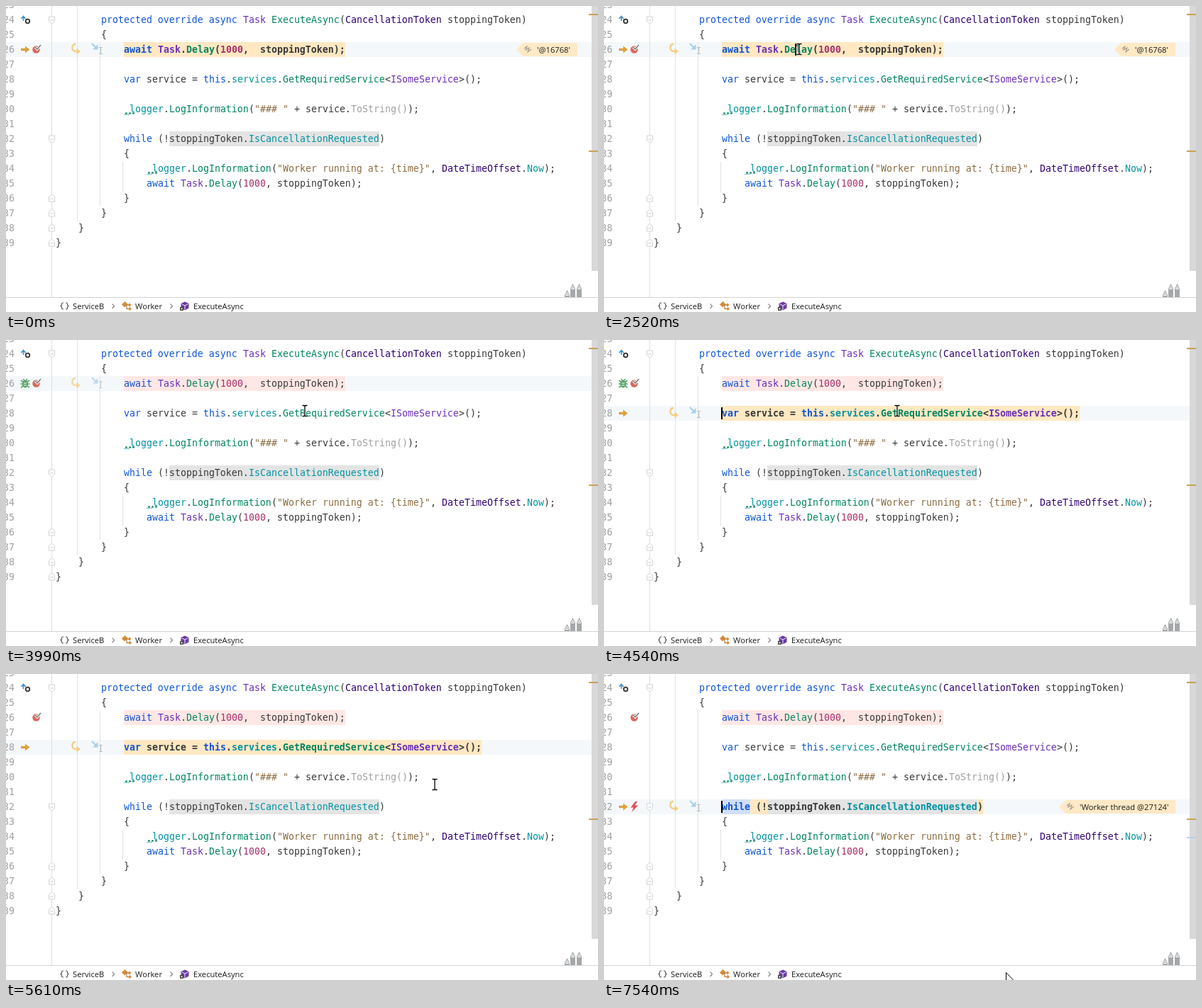
Recreate the animation shown at these times as an HTML page. Size 834 px wide and 432 px high, loop 8 s.

```html
<!DOCTYPE html>
<html lang="en">
<head>
<meta charset="utf-8">
<title>Debugger stepping</title>
<style>
  html, body { margin: 0; width: 100%; height: 100%; overflow: hidden; background: #fff; }
  svg { display: block; width: 834px; height: 432px; }
  text { white-space: pre; }
  .code { font: 13.288px "DejaVu Sans Mono", "Noto Sans Mono", monospace; fill: #383838; }
  .bold { font-weight: bold; }
  .ui { font: 11.2px "Open Sans", "Noto Sans", sans-serif; fill: #1a1a1a; }
  .k { fill: #0f54d6; } .t { fill: #6b2fba; } .m { fill: #00855f; } .f { fill: #0093a1; }
  .s { fill: #8c6c41; } .n { fill: #ab2f6b; } .v { fill: #300073; } .g { fill: #a0a0a0; }
</style>
</head>
<body>
<svg id="stage" viewBox="0 0 834 432" xmlns="http://www.w3.org/2000/svg"></svg>
<script>
(() => {
const LOOP = 8000, CHAR = 8, LEFT = 70, ROW = 21;
const EXEC = '#ffe8c2', PINK = '#ffe7e5';
const stage = document.getElementById('stage');
const rowTop = n => 9 + (n - 24) * ROW;

function add(name, attrs = {}, parent = stage, text) {
  const el = document.createElementNS('http://www.w3.org/2000/svg', name);
  for (const key in attrs) el.setAttribute(key, attrs[key]);
  if (text !== undefined) el.textContent = text;
  parent.appendChild(el);
  return el;
}
const group = (parent = stage) => add('g', {}, parent);
const rect = (x, y, width, height, fill, parent) => add('rect', { x, y, width, height, fill }, parent);
const path = (d, fill, parent) => add('path', { d, fill }, parent);
const stroke = (d, color, width = 1, parent) =>
  add('path', { d, fill: 'none', stroke: color, 'stroke-width': width }, parent);
const label = (x, y, text, parent, cls = 'ui') => add('text', { x, y, class: cls }, parent, text);
const show = (el, on) => el.setAttribute('visibility', on ? 'visible' : 'hidden');
const move = (el, x, y) => el.setAttribute('transform', `translate(${x} ${y})`);

// Each line: indent, then tokens split by "|" whose first letter is the colour class.
const logger = 'f_logger|d.|mLogInformation|d(|s';
const lines = {
  24: [8, 'kprotected override async |tTask |mExecuteAsync|d(|vCancellationToken|d stoppingToken)'],
  25: [8, 'd{'],
  26: [12, 'kawait |tTask|d.|mDelay|d(|n1000|d,  stoppingToken);'],
  28: [12, 'kvar |dservice = |kthis|d.|fservices|d.|mGetRequiredService|d<|tISomeService|d>();'],
  30: [12, logger + '"### "|d + service.|gToString()|d);'],
  32: [12, 'kwhile |d(!stoppingToken.|fIsCancellationRequested|d)'],
  33: [12, 'd{'],
  34: [16, logger + '"Worker running at: {time}"|d, |vDateTimeOffset|d.|fNow|d);'],
  35: [16, 'kawait |tTask|d.|mDelay|d(|n1000|d, stoppingToken);'],
  36: [12, 'd}'],
  37: [8, 'd}'],
  38: [4, 'd}'],
  39: [0, 'd}']
};

// Backgrounds
const caretRow = rect(0, 0, 825, ROW, '#f4f8fa');
for (const [x, y1, y2] of [[100.5, 0, 303], [132.5, 51, 282], [164.5, 220, 262]])
  stroke(`M${x} ${y1}V${y2}`, '#e2e2e2');
stroke('M64.5 0V411', '#dedede');
const mark26 = rect(166, rowTop(26), 312, ROW, EXEC);
const mark28 = rect(166, rowTop(28), 504, ROW, EXEC);
const mark32 = rect(166, rowTop(32), 368, ROW, EXEC);
const whileMark = rect(166, rowTop(32), 40, ROW, '#cfdefa');
rect(230, rowTop(32), 296, ROW, '#e4e4e4');

// Code and line numbers
const codeRows = {};
for (const n in lines) {
  const [indent, source] = lines[n];
  const g = codeRows[n] = group();
  let x = LEFT + indent * CHAR;
  for (const token of source.split('|')) {
    label(x, rowTop(n) + 15, token.slice(1), g, 'code ' + token[0]);
    x += (token.length - 1) * CHAR;
  }
}
for (let n = 23; n < 40; n++) label(-4, rowTop(n) + 15, n, stage, 'code g');
for (const [x, n] of [[168, 30], [200, 34]])
  add('path', { d: `M${x} ${rowTop(n) + 16.5}h13`, stroke: '#00855f', 'stroke-width': 2, 'stroke-dasharray': '3 2' });

// Fold handles
for (const n of [24, 32, 36, 37, 38, 39]) {
  const g = group();
  const closing = n > 32;
  add('path', {
    d: 'M-4 -4.5H4V2L0 5.5L-4 2Z', fill: '#fff', stroke: '#d2d2d2',
    transform: closing ? 'scale(1 -1)' : 'scale(1)'
  }, g);
  stroke('M-2 .5H2', '#c4c4c4', 1, g);
  move(g, 64.5, rowTop(n) + 10.5);
}

// Gutter icons
stroke('M21.5 18L24.5 14.5L27.5 18M24.5 15V21', '#3b8ed0', 1.6);
add('circle', { cx: 30.5, cy: 21.5, r: 2.8, fill: '#fff', stroke: '#333', 'stroke-width': 1.8 });

add('circle', { cx: 42.5, cy: 61.5, r: 5.2, fill: '#d9695f' });
stroke('M41 58L44 61L49 55', '#fff', 3.4);
stroke('M41 58L44 61L49 55', '#777', 1.5);

const arrow = group();
path('M-6 -1.8H0V-5L6.5 0L0 5V1.8H-6Z', '#dda23c', arrow);

const bug = group();
stroke('M-6 -4L-3 -2M6 -4L3 -2M-6.5 1H6.5M-6 6L-3 4M6 6L3 4M-3 -6L-1 -4M3 -6L1 -4', '#5ba36a', 1.6, bug);
add('ellipse', { cx: 0, cy: 1, rx: 4.2, ry: 5.4, fill: '#5ba36a' }, bug);
stroke('M-2 0H2M-2 3H2', '#fff', 1.1, bug);
move(bug, 27, 61);

const hammer = group();
path('M-6 -2L-2 -6L2 -5L1 -3L2 -1L7 4.5L5 6.5L-1 1L-3 -1L-4 0Z', '#6e7478', hammer);
move(hammer, 27, 103);

const bolt = path('M44 180L37.5 188.5H41.5L39 195L48 185.5H43.5L47 180Z', '#e3505a');

// Step over and run-to-cursor icons
const stepIcons = group();
stroke('M98 -7H96.5A4.5 4.5 0 0 0 93.5 -3V-1A4.5 4.5 0 0 0 98 3H100', '#f3ce84', 2.4, stepIcons);
path('M99.5 -1.5L105 3L99.5 7.5Z', '#f3ce84', stepIcons);
stroke('M121 -8L127 -2', '#a9cfea', 2.2, stepIcons);
path('M129.5 -7V.5H122Z', '#a9cfea', stepIcons);
stroke('M131 -2.5H136M133.5 -2.5V6.5M131 6.5H136', '#b9bec2', 1.2, stepIcons);

// Thread hints at the right
function threadHint(x, n, text) {
  const g = group();
  const y = rowTop(n) + 1;
  path(`M${x} ${y + 9.5}L${x + 7} ${y + 2}Q${x + 9} ${y} ${x + 12} ${y}H803Q805 ${y} 805 ${y + 2}V${y + 17}` +
    `Q805 ${y + 19} 803 ${y + 19}H${x + 12}Q${x + 9} ${y + 19} ${x + 7} ${y + 17}Z`, '#ffe9c6', g);
  stroke(`M${x + 11} ${y + 8}l4 -3l-2 5l5 -3l-2 6l5 -4`, '#a39a8b', 1.1, g);
  label(x + 29, y + 14, text, g);
  return g;
}
const hint26 = threadHint(719, 26, "'@16768'");
const hint32 = threadHint(641, 32, "'Worker thread @27124'");

// Scrollbar and its marks
rect(825, 0, 9, 374, '#d8d8d8');
rect(821, 11, 13, 2, '#c9a253');
rect(821, 204, 13, 2, '#c9a253');
const blueMark = rect(821, 230, 13, 2, '#b9d0ee');

// Pencils
for (const [x, y] of [[787, 401], [795, 392], [804, 392]]) {
  path(`M${x} 411V${y + 7}L${x + 3.5} ${y}L${x + 7} ${y + 7}V411Z`, '#a5a8aa');
  stroke(`M${x + 1.5} ${y + 7.5}H${x + 5.5}L${x + 3.5} ${y + 3.5}Z`, '#fff', 1);
}

// Breadcrumbs
rect(0, 411, 834, 21, '#fff');
stroke('M0 411.5H834', '#d4d4d4');
stroke('M81 419H80Q78.5 419 78.5 421V422L77 423.5L78.5 425V426Q78.5 428 80 428H81' +
  'M84 419H85Q86.5 419 86.5 421V422L88 423.5L86.5 425V426Q86.5 428 85 428H84', '#555', 1.2);
label(94, 428, 'ServiceB');
label(182, 428, 'Worker');
label(264, 428, 'ExecuteAsync');
for (const x of [149.5, 231.5]) stroke(`M${x} 420.5L${x + 3} 423.8L${x} 427`, '#777', 1.1);
path('M163 421.5L167.5 417L171.5 421L167 425.5Z', '#d98b34');
stroke('M169 422H174M170 422V427.5H174', '#a06a35', 1.1);
path('M174 419.5L176.5 422L174 424.5L171.5 422Z', '#d98b34');
path('M174.5 425L177 427.5L174.5 430L172 427.5Z', '#d98b34');
path('M252 417.5L257.5 420V426.5L252 429.5L246.5 426.5V420Z', '#6b3aa5');
stroke('M247.5 420.7L252 423L256.5 420.7M252 423V428.5', '#fff', .9);
rect(245, 425, 5, 5, '#444');
rect(246.5, 426.5, 2, 2, '#fff');

// Quick documentation
const popup = group();
add('rect', { x: 421.5, y: 113.5, width: 430, height: 133, fill: '#f7f7f7', stroke: '#bcbcbc' }, popup);
['(extension) ISomeService GetRequiredService<ISomeService>()',
 'in class ServiceProviderServiceExtensions',
 'Get service of type T from the IServiceProvider.',
 'Returns: A service object of type T.'
].forEach((text, i) => label(431, 134 + i * 28, text, popup));

const caret = rect(0, 0, 2, 17, '#000');

// Mouse pointer
const beam = group();
const beamPath = 'M-3.5 -7.5H-1L0 -6.5L1 -7.5H3.5M0 -6.5V6.5M-3.5 7.5H-1L0 6.5L1 7.5H3.5';
stroke(beamPath, '#fff', 2.6, beam);
stroke(beamPath, '#000', 1.3, beam);
const pointer = add('path', {
  d: 'M.5 .5V16.5L4.2 13L6.8 19L9 18L6.5 12H11.5Z', fill: '#fff', stroke: '#000'
});

const linear = p => p;
const smooth = p => p * p * (3 - 2 * p);
// start, end, steps, from, bend, to, easing
const moves = [
  [590, 1210, 9, [657, 444], [465, 252], [274.5, 60.5], linear],
  [3150, 3610, 7, [274.5, 60.5], [345, 75], [421, 99.5], smooth],
  [4540, 4620, 2, [421, 99.5], [413, 100], [405, 100.5], linear],
  [4710, 4930, 4, [405, 100.5], [408, 103], [413, 104.5], smooth],
  [5080, 5610, 8, [413, 104.5], [520, 122], [604, 156], smooth],
  [6220, 6220, 1, [604, 156], [603.5, 156], [603, 156], linear],
  [7000, 7540, 8, [603, 156], [630, 300], [566, 421], smooth]
];

function mouseAt(t) {
  const m = moves.filter(item => t >= item[0]).pop();
  if (!m) return null;
  const [start, end, steps, a, b, c, ease] = m;
  const gap = (end - start) / (steps - 1 || 1);
  const step = gap ? Math.min(steps - 1, Math.floor((t - start) / gap + 1e-6)) : 0;
  const p = ease((step + 1) / steps), q = 1 - p;
  return [0, 1].map(i => q * q * a[i] + 2 * q * p * b[i] + p * p * c[i]);
}

const carets = [[2520, 2980], [3440, 3990], [4540, 5080], [6450, 7000], [7460, LOOP]];

function draw(t) {
  const within = (a, b) => t >= a && t < b;
  const row = t < 4540 ? 26 : t < 6450 ? 28 : 32;
  const running = within(3150, 4540) || within(6070, 6450);
  const y = rowTop(row);

  caretRow.setAttribute('y', y);
  mark26.setAttribute('fill', t < 3150 ? EXEC : PINK);
  show(mark28, row === 28 && !running);
  show(mark32, row === 32);
  show(whileMark, t >= 6540);
  for (const n of [26, 28, 32])
    for (const el of codeRows[n].children) el.classList.toggle('bold', n === row && !running);

  show(arrow, !running);
  move(arrow, 27, y + 10.5);
  show(bug, within(3150, 4710));
  show(hammer, within(6070, 6540));
  show(bolt, t >= 6540);
  move(stepIcons, 0, y + 10);
  stepIcons.setAttribute('opacity', running ? .75 : 1);
  show(hint26, t < 3150);
  show(hint32, row === 32);
  show(blueMark, t >= 6540);
  show(popup, within(4160, 4540));

  show(caret, carets.some(([a, b]) => within(a, b)));
  caret.setAttribute('x', row === 26 ? 269 : 165);
  caret.setAttribute('y', y + 2);

  const mouse = mouseAt(t);
  const overBar = mouse && mouse[1] > 411;
  show(beam, mouse && !overBar);
  show(pointer, overBar);
  if (mouse) move(overBar ? pointer : beam, Math.round(mouse[0]), Math.round(mouse[1]));
}

const began = performance.now();
function tick() {
  draw((performance.now() - began) % LOOP);
  requestAnimationFrame(tick);
}
tick();
})();
</script>
</body>
</html>
```
